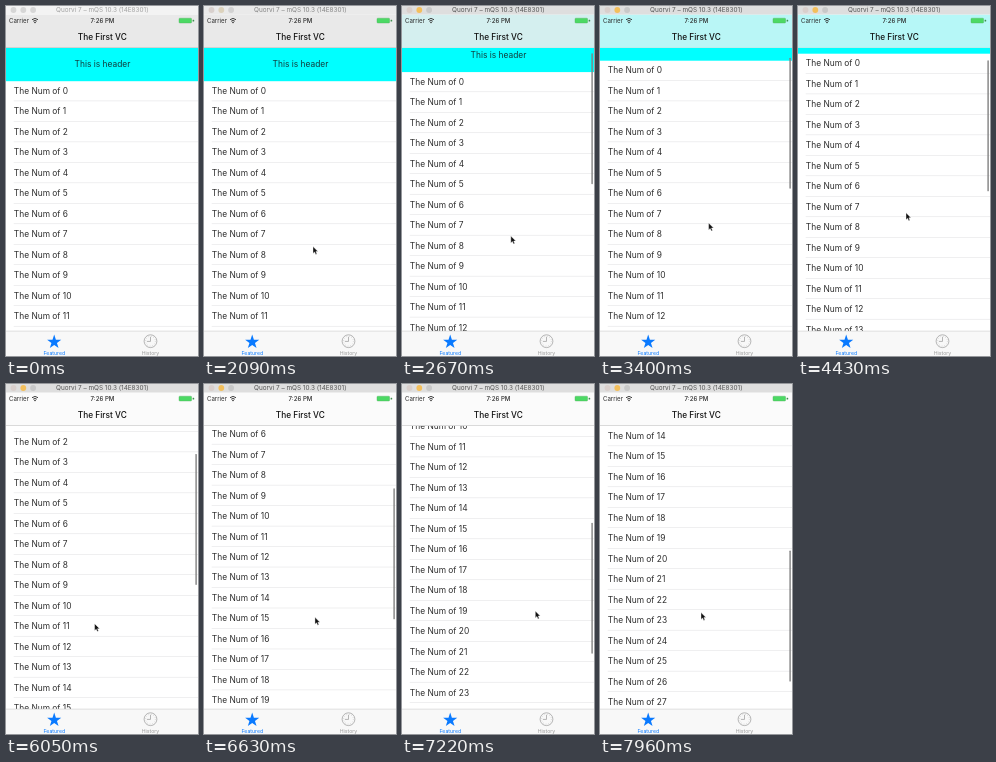
An HTML page for the animation above (8 s loop, 192 by 350 pixels).

```html
<!DOCTYPE html>
<html lang="en">
<head>
<meta charset="utf-8">
<style>
html, body { margin: 0; width: 100%; height: 100%; overflow: hidden; background: #fff; }
svg { display: block; width: 100vw; height: 100vh; font-family: Inter, Roboto, sans-serif; }
</style>
</head>
<body>
<svg viewBox="0 0 192 350">
  <defs>
    <clipPath id="view"><rect y="42" width="192" height="283"/></clipPath>
  </defs>
  <rect width="192" height="350" fill="#fff"/>

  <g clip-path="url(#view)">
    <g id="list" font-size="8.4" fill="#2c2c2c">
      <rect y="42" width="192" height="33.2" fill="#00ffff"/>
      <text x="96.5" y="61.3" text-anchor="middle" fill="#123c3c">This is header</text>
    </g>
    <rect id="thumb" x="189.4" width="1.4" height="131" rx=".7" fill="#808080"/>
  </g>

  <rect id="nav" y="8.5" width="192" height="33.5"/>
  <rect id="navLine" y="41.5" width="192" height=".5" fill="#b8b8b8"/>
  <text x="96.3" y="33.7" font-size="8.3" font-weight="500" text-anchor="middle" fill="#111">The First VC</text>

  <g font-size="6.1" fill="#2a2a2a">
    <text x="3" y="17.2">Carrier</text>
    <text x="96.5" y="17.2" font-weight="500" text-anchor="middle">7:26 PM</text>
    <path d="M26 13.7q3-2.6 6 0M27.2 15.2q1.8-1.5 3.6 0" fill="none" stroke="#2a2a2a" stroke-width=".9"/>
    <circle cx="29" cy="16.5" r=".8"/>
    <rect x="173" y="12.2" width="12.6" height="4.8" rx=".8" fill="#4cd964" stroke="#4fae5e" stroke-width=".4"/>
    <rect x="186.6" y="13.7" width="1.6" height="1.8" rx=".5" fill="#3f8f4e"/>
  </g>

  <rect id="bar" width="192" height="8.5"/>
  <g id="lights"></g>
  <text id="caption" x="96.3" y="6.3" font-size="6.4" text-anchor="middle">Quorvi 7 – mQS 10.3 (14E8301)</text>

  <rect y="325" width="192" height="25" fill="#f8f8f8"/>
  <rect y="324.8" width="192" height=".5" fill="#c4c4c4"/>
  <g font-size="5.2" text-anchor="middle">
    <path id="star" fill="#0a7aff"/>
    <text x="48.3" y="348.7" fill="#0a7aff">Featured</text>
    <g fill="none" stroke="#999" stroke-width=".7">
      <circle cx="144.5" cy="335.2" r="6.4"/>
      <circle cx="144.5" cy="335.2" r="4.9" stroke-width=".6" stroke-dasharray=".5 2.066"/>
      <path d="M144.5 330.8v4.6h-3.6"/>
    </g>
    <text x="144.5" y="348.7" fill="#9a9a9a">History</text>
  </g>

  <path id="cursor" d="M0 0V6.9L1.6 5.5L2.7 7.9L3.9 7.4L2.9 5H5Z" fill="#111" stroke="#fff" stroke-width=".4"/>
</svg>
<script>
const NS = 'http://www.w3.org/2000/svg';
const LOOP = 8000, STEP = 147.3, ROW = 20.48, ROWS = 35;
const $ = id => document.getElementById(id);

function add(parent, tag, attrs, text) {
  const el = document.createElementNS(NS, tag);
  for (const k in attrs) el.setAttribute(k, attrs[k]);
  if (text) el.textContent = text;
  return parent.appendChild(el);
}

for (let i = 0; i < ROWS; i++) {
  const y = 74.5 + i * ROW;
  add($('list'), 'text', { x: 7.8, y: y + 13.4 }, 'The Num of ' + i);
  add($('list'), 'rect', { x: 7.7, y: y + ROW - .3, width: 185, height: .5, fill: '#dedee0' });
}

const lights = [7.5, 17.3, 27.1].map(cx => add($('lights'), 'circle', { cx, cy: 4, r: 2.9 }));

$('star').setAttribute('d', 'M' + Array.from({ length: 10 }, (_, i) => {
  const r = i % 2 ? 2.9 : 7.4, a = i * Math.PI / 5;
  return (48.2 + r * Math.sin(a)).toFixed(2) + ' ' + (336 - r * Math.cos(a)).toFixed(2);
}).join('L') + 'Z');

// [step, scroll offset, cursor x, cursor y]
const keys = [
  [0, 0, 194, 300], [7, 0, 194, 300], [11, 0, 109, 240.5], [14, 0, 109, 240.5],
  [23, 20.5, 108.6, 217], [30, 27.5, 108, 206.8], [39, 68, 88.6, 239.7],
  [41, 68, 88.6, 239.7], [49, 247.3, 133.3, 227], [54, 319.8, 101, 228.5]
];

function pose(k) {
  let i = 0;
  while (i < keys.length - 2 && keys[i + 1][0] <= k) i++;
  const a = keys[i], b = keys[i + 1];
  const u = Math.min(1, (k - a[0]) / (b[0] - a[0]));
  return a.map((v, j) => v + (b[j] - v) * u);
}

const clamp = v => Math.max(0, Math.min(1, v));
const mix = (a, b, u) => a.map((v, i) => v + (b[i] - v) * u);

function navColor(offset) {
  const tinted = mix([233, 233, 233], [182, 247, 247], clamp(offset / 22));
  const c = mix(tinted, [251, 251, 251], clamp((offset - 34) / 30));
  return `rgb(${c.map(Math.round)})`;
}

// window focus: 0 idle, 1 waking, 2 active
const looks = [
  { bar: '#f3f3f3', text: '#a2a2a2', dots: ['#d6d6d6', '#d6d6d6', '#d6d6d6'] },
  { bar: '#eaeaea', text: '#858585', dots: ['#d8d0cd', '#dcd2bc', '#d2d2d2'] },
  { bar: '#dedede', text: '#555', dots: ['#d9cfcc', '#f3bf5c', '#c8c8c8'] }
];

function draw(t) {
  const k = Math.floor((t + 10) / STEP);
  const [, offset, x, y] = pose(k);
  const look = looks[k < 11 ? 0 : k < 15 ? 1 : 2];

  $('list').setAttribute('transform', `translate(0 ${-offset})`);
  $('thumb').setAttribute('y', 43.8 + offset * .384);
  $('thumb').setAttribute('opacity', offset > 0 ? 1 : 0);
  $('nav').setAttribute('fill', navColor(offset));
  $('navLine').setAttribute('opacity', offset > 0 && offset < 33 ? .3 : 1);
  $('bar').setAttribute('fill', look.bar);
  $('caption').setAttribute('fill', look.text);
  lights.forEach((el, i) => el.setAttribute('fill', look.dots[i]));
  $('cursor').setAttribute('transform', `translate(${x} ${y})`);
}

function tick() {
  draw(performance.now() % LOOP);
  requestAnimationFrame(tick);
}
tick();
</script>
</body>
</html>
```
